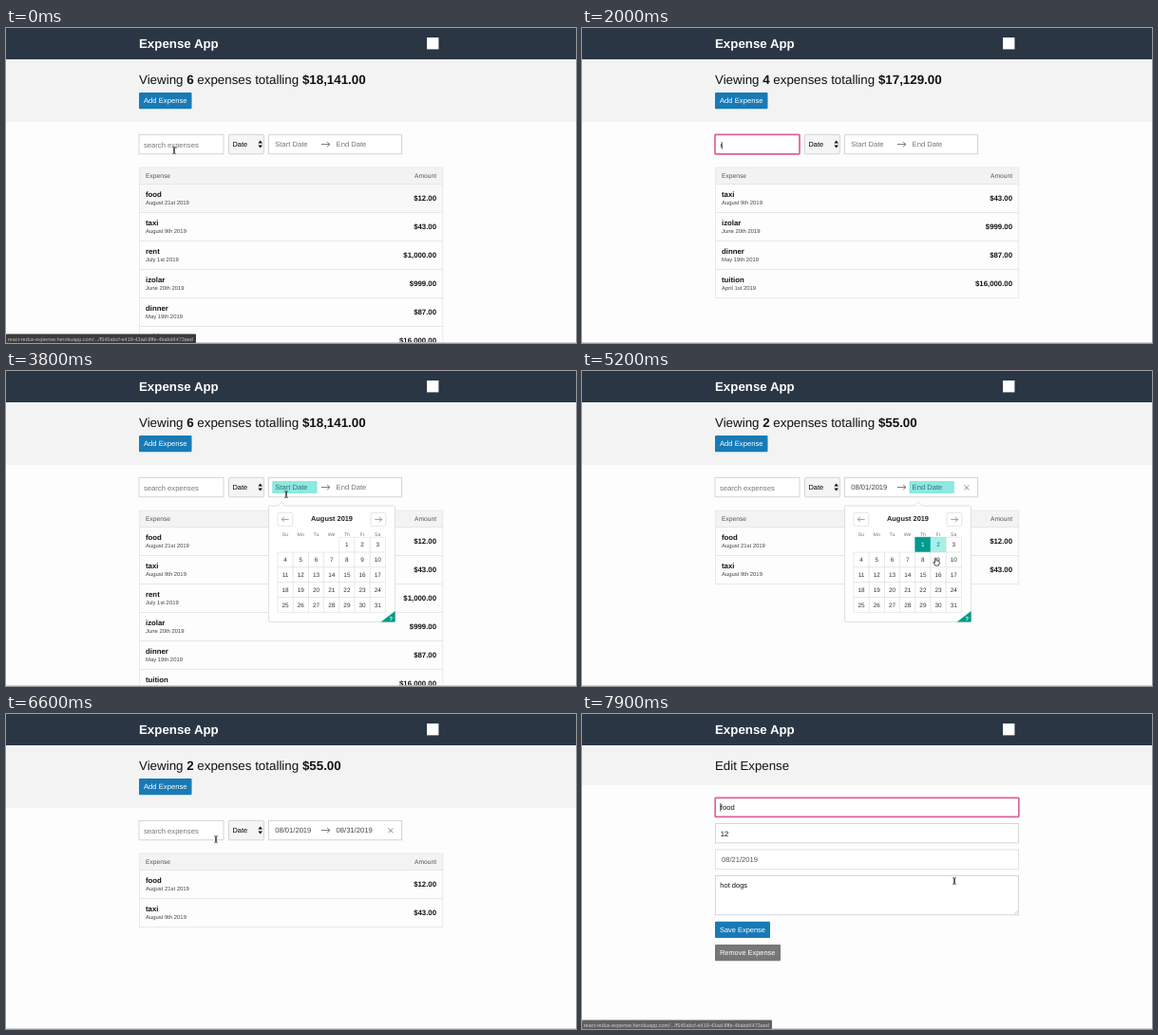
An HTML page that plays this animation: 600 px wide and 332 px high, repeating every 8000 ms.

```html
<!DOCTYPE html>
<html lang="en">
<head>
<meta charset="utf-8">
<title>Expense App</title>
<style>
  html, body { margin: 0; width: 100%; height: 100%; overflow: hidden; background: #fdfdfd; }
  svg { display: block; width: 100%; height: 100%; }
  text { font-family: "Liberation Sans", Arial, sans-serif; text-rendering: geometricPrecision; white-space: pre; }
</style>
</head>
<body>
<svg id="stage" viewBox="0 0 600 332"></svg>
<script>
const LOOP = 8000, STEP = 100;
const BLUE = '#187ab5', PINK = '#df6099', TEAL = '#009a8b', LINE = '#e5e5e5', EDGE = '#cacccd';
const CALENDAR_OPEN = 3400, START_PICKED = 4800, END_PICKED = 5900, EDITING = 7500;

const expenses = [
  ['food', 'August 21st 2019', 12],
  ['taxi', 'August 9th 2019', 43],
  ['rent', 'July 1st 2019', 1000],
  ['izolar', 'June 20th 2019', 999],
  ['dinner', 'May 19th 2019', 87],
  ['tuition', 'April 1st 2019', 16000],
];

// [time, value] pairs; each value holds until the next time
const queries = [[0, ''], [1000, 'i'], [1300, 'iz'], [1400, 'izo'], [1500, 'izol'],
  [1800, 'izo'], [1900, 'iz'], [2000, 'i'], [2300, '']];
const cursors = [[0, 'beam'], [1000, ''], [2900, 'beam'], [3950, 'arrow'], [4200, 'hand'],
  [6350, 'arrow'], [6550, 'beam'], [6800, 'arrow'], [7150, 'hand'], [7900, 'beam']];
const statusOpacity = [[0, 1], [200, .6], [300, .25], [400, 0], [7300, .5], [7400, 1], [7900, .8]];

// [time, x, y]
const path = [[0, 177, 129], [100, 177, 129], [400, 181, 125], [2900, 181, 125], [3400, 295, 130],
  [3800, 295, 130], [4500, 359, 185], [4900, 359, 185], [5100, 361, 187], [5200, 373, 201],
  [5600, 391, 246], [6200, 391, 246], [6600, 221, 132], [6700, 221, 132], [7200, 392, 176], [LOOP, 392, 176]];

const at = (list, t) => list.filter(([from]) => from <= t).pop()[1];
const money = n => '$' + n.toLocaleString('en-US', { minimumFractionDigits: 2 });

function pointer(t) {
  const i = Math.max(1, path.findIndex(([time]) => time > t));
  const [t0, x0, y0] = path[i - 1], [t1, x1, y1] = path[i];
  const p = (t - t0) / (t1 - t0), e = p * p * (3 - 2 * p);
  return [x0 + (x1 - x0) * e, y0 + (y1 - y0) * e];
}

const rect = (x, y, w, h, fill, extra = '') =>
  `<rect x="${x}" y="${y}" width="${w}" height="${h}" fill="${fill}" ${extra}/>`;
const stroke = (d, color, width = 1, extra = '') =>
  `<path d="${d}" fill="none" stroke="${color}" stroke-width="${width}" ${extra}/>`;
const shape = (d, fill, extra = '') => `<path d="${d}" fill="${fill}" ${extra}/>`;
const text = (x, y, s, size, fill = '#222', extra = '') =>
  `<text x="${x}" y="${y}" font-size="${size}" fill="${fill}" ${extra}>${s}</text>`;
const BOLD = 'font-weight="700"', MIDDLE = 'text-anchor="middle"', END = 'text-anchor="end"';
const bold = s => `<tspan ${BOLD}>${s}</tspan>`;

const field = (x, y, w, h, focused, edge = EDGE, fill = '#fff') => focused
  ? rect(x, y, w, h, fill, `stroke="${PINK}" stroke-width="1.7" rx=".6"`)
  : rect(x, y, w, h, fill, `stroke="${edge}" stroke-width=".8"`);
const button = (y, w, label, size, fill) =>
  rect(140, y, w, 17.3, fill, 'rx="1"') + text(145, y + 11.4, label, size, '#fff');
const caret = (x, y) => rect(x, y, .7, 8.6, '#111');
const arrow = (x, y, dir, color, w = 9) => stroke(
  `M${x - dir * w / 2} ${y}h${dir * w}m${-dir * 2.8} -2.6l${dir * 2.8} 2.6l${-dir * 2.8} 2.6`, color, .8);

function header(bandHeight) {
  return rect(0, 0, 600, 332, '#fdfdfd') + rect(0, 33, 600, bandHeight, '#f3f3f3')
    + rect(0, 0, 600, 33, '#2b3645') + text(140, 21, 'Expense App', 13.3, '#fff', BOLD)
    + rect(443, 10, 12.4, 12.4, '#fff');
}

function filters(t, query) {
  const focused = t >= 300 && t < CALENDAR_OPEN;
  const hasStart = t >= START_PICKED, hasEnd = t >= END_PICKED, open = t >= CALENDAR_OPEN && !hasEnd;
  let out = field(140, 112.3, 89, 20.5, focused);
  out += query
    ? text(145.5, 125.5, query + '<tspan dx="-.4">|</tspan>', 7.7, '#111')
    : text(145, 125.5, 'search expenses', 7.65, '#777');
  if (focused && !query && (t < 800 || t >= 2300 && t < 2800)) out += caret(145.4, 118);
  out += rect(234.4, 112.3, 37, 20.5, '#f5f5f5', `stroke="${EDGE}" stroke-width=".8" rx="1"`)
    + text(238.5, 125.3, 'Date', 7.4, '#000')
    + shape('M265.4 121.6h4.6l-2.3 -3zM265.4 123.4h4.6l-2.3 3z', '#111');
  out += field(276.6, 112.3, 140, 20.5, false);
  if (open) out += rect(hasStart ? 344.5 : 280.2, 116, 47.4, 13, '#8de9e1', 'rx="1"');
  out += text(283.3, 125.3, hasStart ? '08/01/2019' : 'Start Date', 7.6, hasStart ? '#444' : open ? '#35716f' : '#757575')
    + arrow(336.4, 122.6, 1, '#555')
    + text(347.6, 125.3, hasEnd ? '08/31/2019' : 'End Date', 7.6, hasEnd ? '#444' : open && hasStart ? '#35716f' : '#757575');
  if (hasStart) out += stroke('M402.3 120.3l5 5m0 -5l-5 5', '#777', .8);
  return out;
}

function table(rows, hovered) {
  let out = rect(140.4, 147, 319.4, 17.5, '#f3f3f3', `stroke="${LINE}" stroke-width=".8"`)
    + text(147, 158, 'Expense', 6.7, '#555') + text(453, 158, 'Amount', 6.7, '#555', END);
  rows.forEach(([name, date, amount], i) => {
    const y = 164.5 + 30 * i;
    out += rect(140.4, y, 319.4, 30, hovered && !i ? '#f8f8f8' : '#fdfdfd', `stroke="${LINE}" stroke-width=".8"`)
      + text(147, y + 13.5, name, 7.8, '#111', BOLD) + text(147, y + 21.3, date, 5.9, '#444')
      + text(453, y + 17.6, money(amount), 7.8, '#111', BOLD + ' ' + END);
  });
  return out;
}

function dayUnder([x, y]) {
  const col = Math.floor((x - 286) / 16.2), row = Math.floor((y - 175) / 15.9);
  return col >= 0 && col < 7 && row >= 0 ? row * 7 + col - 3 : 0;
}

function calendar(t) {
  const ranged = t >= START_PICKED, fang = ranged ? 354 : 290;
  const hovered = dayUnder(pointer(t - STEP));
  let out = rect(276.6, 142, 132.8, 122.5, '#fff', 'stroke="#d5d8d8" stroke-width=".8" rx="1.2"')
    + shape(`M${fang - 4.2} 142.5l4.2 -4.2l4.2 4.2z`, '#fff')
    + stroke(`M${fang - 4.2} 142l4.2 -4l4.2 4`, '#d5d8d8', .7)
    + text(343, 158.2, 'August 2019', 7.4, '#222', BOLD + ' ' + MIDDLE);
  for (const [x, dir] of [[286, -1], [384, 1]])
    out += rect(x, 149.4, 15.8, 14, '#fff', 'stroke="#dde0e0" stroke-width=".8" rx="1"') + arrow(x + 7.9, 156.4, dir, '#888', 7.5);
  ['Su', 'Mo', 'Tu', 'We', 'Th', 'Fr', 'Sa'].forEach((name, i) => {
    out += text(294 + 16.2 * i, 174, name, 5.2, '#777', MIDDLE);
  });
  for (let day = 1; day <= 31; day++) {
    const x = 286 + (day + 3) % 7 * 16.2, y = 175.2 + Math.floor((day + 3) / 7) * 15.85;
    const picked = ranged && day === 1;
    const spanned = ranged && day > 1 && day <= Math.max(2, hovered);
    const fill = picked ? TEAL : spanned ? '#a8efe8' : !ranged && day === hovered ? '#e4e7e7' : '#fff';
    const edge = picked ? TEAL : spanned ? '#80e8e0' : '#e1e4e4';
    out += rect(x, y, 16.2, 15.85, fill, `stroke="${edge}" stroke-width=".7"`)
      + text(x + 8.1, y + 10.2, day, 6.4, picked ? '#fff' : spanned ? '#007a70' : '#333', MIDDLE);
  }
  return out + shape('M409.6 253v11.6h-15z', TEAL) + text(405.3, 262.8, '?', 5.8, '#fff', BOLD + ' ' + MIDDLE);
}

function listPage(t) {
  const query = at(queries, t);
  const rows = expenses.filter(([name, date]) =>
    name.includes(query) && (t < START_PICKED || date.startsWith('August')));
  const total = rows.reduce((sum, row) => sum + row[2], 0);
  const noun = rows.length === 1 ? 'expense' : 'expenses';
  return header(66)
    + text(140, 58.6, `Viewing ${bold(rows.length)} ${noun} totalling ${bold(money(total))}`, 13.35, '#111')
    + button(68, 55.5, 'Add Expense', 7.65, BLUE)
    + filters(t, query) + table(rows, t < 300 || t >= 7200)
    + (t >= CALENDAR_OPEN && t < END_PICKED ? calendar(t) : '');
}

function editPage() {
  return header(42) + text(140, 58.6, 'Edit Expense', 13.25, '#111')
    + field(140.2, 88.3, 319.6, 20, true) + text(145.8, 101.3, 'food', 7.7, '#111') + caret(145.5, 94)
    + field(140.4, 115.5, 319.2, 20.4) + text(145.8, 128.6, '12', 7.7, '#111')
    + field(140.4, 143, 319.2, 20.4, false, '#dcdcdc') + text(147, 156, '08/21/2019', 7.6, '#555')
    + field(140.4, 170.4, 319.2, 41.4) + text(145.3, 182.6, 'hot dogs', 7.5, '#111')
    + stroke('M455.5 210.5l3 -3m-1.2 3l1.2 -1.2', '#999', .5)
    + button(218.8, 58, 'Save Expense', 7.45, BLUE) + button(243, 69, 'Remove Expense', 7.4, '#777');
}

function cursor(t) {
  const kind = at(cursors, t), [x, y] = pointer(t);
  const outline = 'stroke="#fff" stroke-width=".5"';
  const art = {
    beam: stroke('M-1.7 -3.4Q0 -3.4 0 -2.3V2.3Q0 3.4 -1.7 3.4M1.7 -3.4Q0 -3.4 0 -2.3V2.3Q0 3.4 1.7 3.4', '#222', .9),
    arrow: shape('M-2 -4v8l1.9 -1.8l1.3 2.8l1.2 -.6l-1.2 -2.6h2.5z', '#111', outline),
    hand: shape('M-1.4 -3.6q.7 -.8 1.3 0v2.4l2.8 .6q.8 .3 .6 1.4l-.8 3.2h-3.6l-2.1 -3q0 -1 1 -.6l.8 .7z', '#fff',
      'stroke="#222" stroke-width=".8"'),
  }[kind] || '';
  return `<g transform="translate(${x} ${y})">${art}</g>`;
}

function statusBar(t) {
  return `<g opacity="${at(statusOpacity, t)}">` + rect(0, 322.6, 200, 9.4, '#3b3b3b', 'rx="1"')
    + text(1.8, 329.5, 'react-redux-expense.herokuapp.com/.../f545abcf-e419-43ad-8ffe-4babd4473aed', 5.48, '#c4c4c4') + '</g>';
}

const stage = document.getElementById('stage');
let shown = -1;

function draw(now) {
  const t = Math.floor(now % LOOP / STEP) * STEP;
  if (t !== shown) {
    shown = t;
    stage.innerHTML = (t < EDITING ? listPage(t) : editPage())
      + rect(0, 331.2, 600, .8, '#c8c8c8') + statusBar(t) + cursor(t);
  }
  requestAnimationFrame(() => draw(performance.now() - begun));
}

const begun = performance.now();
draw(0);
</script>
</body>
</html>
```
